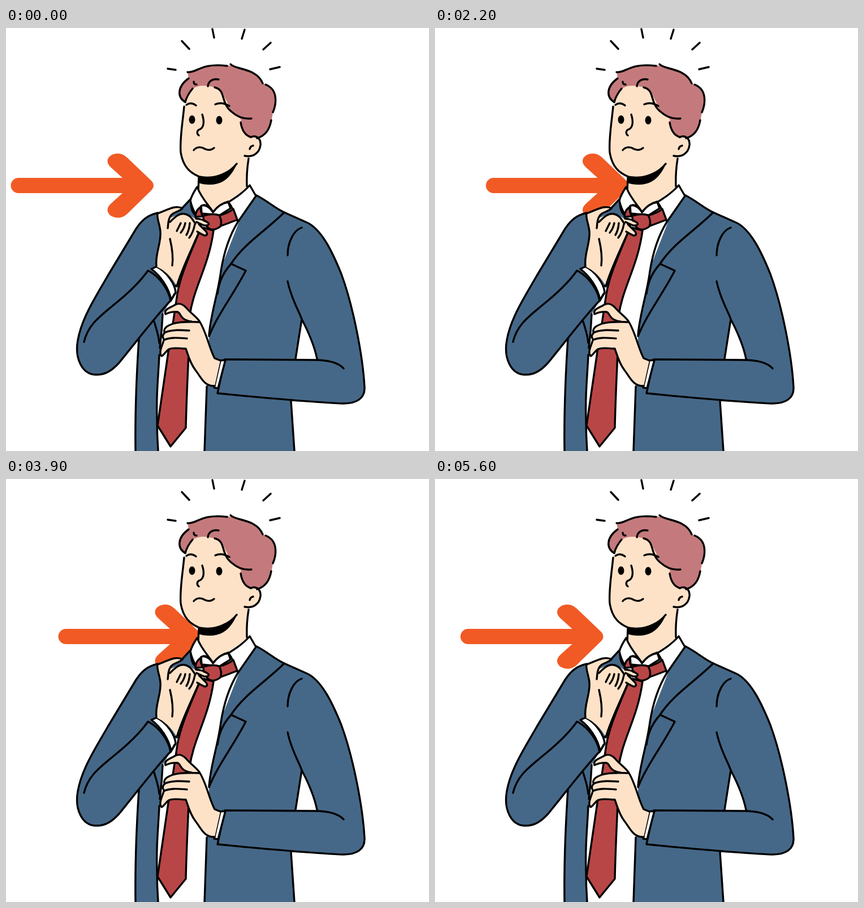
Recreate the animation shown at these times as an HTML page. Size 748 px wide and 748 px high, loop 5.7 s.

```html
<!DOCTYPE html>
<html lang="en">
<head>
<meta charset="utf-8">
<title>Man adjusting his tie</title>
<style>
  html, body { margin: 0; width: 100%; height: 100%; overflow: hidden; background: #fff; }
  svg { display: block; width: 100%; height: 100%; }
  path { stroke-linecap: round; stroke-linejoin: round; }
  .line { fill: none; stroke: #000; stroke-width: 3.4; }
  .suit { fill: #466888; }
  .skin { fill: #fee2c8; }
  .hair { fill: #c47a7c; }
  .tie { fill: #b94647; }
  .white { fill: #fff; }
  .edge { stroke: #000; stroke-width: 3.4; }
</style>
</head>
<body>
<svg viewBox="0 0 748 748">
  <path id="arrow" fill="#f15a24" d="M22 265H206L185 246C173 235 182 222 198 222C205 222 209 225 214 229L257 270Q265 278.5 257 287L214 329C209 333 205 335.500 198 335.500C182 335.500 173 322 185 311L206 292H22A13.500 13.500 0 0 1 22 265Z"/>

  <!-- jacket, right side -->
  <path class="suit" d="M441 295C460 304 475 318 492 326L530 343C558 354 578 398 593 435C614 492 631 580 634 635C635 655 620 664 597 664L504 660L510 748H340L359 545L380 425L412 343Z"/>
  <path class="white" d="M523 515L512 586H550C544 560 533 534 523 515Z"/>

  <!-- shirt -->
  <path class="white" d="M330 308L305 452L277 508L268 650L269 748H351L355 632L359 545C364 500 374 466 380 430C386 395 396 368 411 342L366 322Z"/>

  <!-- jacket, left side -->
  <path class="suit" d="M326 302L312 318L268 327C250 331 240 340 230 355L180 438C160 473 134 512 127 552C121 585 135 612 158 613C176 614 188 605 200 592L235 549C231 610 228 680 229 748H269C265 710 266 665 268 640L273 565L277 506L291 482L300 460L337 332Z"/>
  <path class="line" d="M268 327C250 331 240 340 230 355L180 438C160 473 134 512 127 552C121 585 135 612 158 613C176 614 188 605 200 592C235 549 262 513 291 482C287 461 270 438 251 429C235 452 210 474 190 490C165 511 145 525 138 555"/>
  <path class="line" d="M235 549C231 610 228 680 229 748M262 519C266 533 270 543 271 557M277 506C276 530 274 550 272 566M271 578C270 610 265 650 267 690Q267 720 269 748M326 303L311 319M327 303Q326 325 336 332"/>

  <!-- jacket seams and right arm -->
  <path class="line" d="M441 295C460 304 475 318 492 326L530 343C558 354 578 398 593 435C614 492 631 580 634 635C635 655 620 664 597 664C550 663 470 655 374 646L387 586L545 587C570 587 588 592 597 602M504 660L510 748M355 634L351 748"/>
  <path class="line" d="M492 326C460 358 420 382 398 417L424 429C402 472 375 505 359 545M398 417C380 437 376 455 374 470M410 343C392 372 384 405 380 430C375 470 362 505 359 543"/>
  <path class="line" d="M498 402C498 380 508 358 523 353M498 448C505 481 519 502 523 515C534 536 545 560 550 585M523 515L512 585"/>

  <!-- neck and collar -->
  <path class="skin" d="M341 255L340 290C346 305 356 316 366 325C383 312 408 297 427 280L430 215Z"/>
  <path class="line" d="M341 263L340 288M429 231Q425 255 426 280"/>
  <path class="white edge" d="M338 281C332 290 328 297 326 305Q329 319 336 330L345 315C352 309 360 317 366 325C356 310 345 300 338 281Z"/>
  <path class="white edge" d="M431 278L442 297L410 343C406 330 400 317 393 307C385 309 376 315 366 326C385 311 413 299 431 278Z"/>
  <path class="white edge" d="M345 315C350 311 360 316 366 326C374 315 384 309 393 308L397 319L378 331L346 328Z"/>

  <!-- tie -->
  <path class="tie edge" d="M345 316C338 320 335 327 335 334L348 333Q343 324 345 316ZM378 331Q392 328 402 320L409 339Q394 345 380 350Z"/>
  <path class="tie edge" d="M345 352C326 400 309 435 303 470L291 550L288 566L268 703L291 740L318 707C319 660 321 620 323 575L324 515C330 460 358 425 367 358Z"/>
  <path class="tie edge" d="M349 332Q365 327 377 331Q383 343 379 351Q370 358 362 356Q349 350 349 332Z"/>

  <!-- raised hand and cuff -->
  <path class="white edge" d="M257 426L266 422C283 430 299 452 300 468L292 481C288 459 273 438 257 426Z"/>
  <path class="skin" d="M268 328C285 322 300 312 312 319C304 326 294 326 290 336C300 332 308 326 318 329C327 331 331 336 336 338L358 345Q362 351 347 349L355 362Q353 371 341 363C331 385 318 417 302 456C293 440 280 428 266 422C263 400 275 380 273 360Z"/>
  <path class="line" d="M302 457C309 430 329 390 340 364M266 422C263 400 275 380 273 360C272 347 266 336 268 328C285 322 300 312 312 319C305 326 294 325 290 334C286 341 287 349 286 354M290 343C298 335 307 326 317 329C327 331 331 341 335 346M290 373C294 390 296 405 294 420M309 345L302 359M317 345Q315 355 309 362M325 345Q324 358 319 366M334 347Q331 362 324 371M336 337Q350 338 358 345Q360 350 350 349Q342 346 337 343M341 347L354 360Q358 367 351 367Q344 364 338 360M300 456L307 452M298 470L291 483"/>

  <!-- lower hand and cuff -->
  <path class="white edge" d="M379 588L388 587L375 637L368 636Z"/>
  <path class="skin" d="M282 506C279 497 290 495 298 490C306 485 312 488 318 494C328 506 338 511 343 520C355 540 360 568 369 584L379 588L369 633C350 634 344 616 335 605C325 592 322 578 318 567C306 567 296 564 288 568C282 572 279 579 275 580C269 574 277 560 279 552C275 547 279 542 280 539C278 532 284 528 293 524C305 519 318 520 328 520C318 516 309 512 307 504Q302 501 282 506Z"/>
  <path class="line" d="M369 633C350 634 344 616 335 605C325 592 322 578 318 567C306 567 296 564 288 568C282 572 279 579 275 580C269 574 277 560 279 552C290 546 306 548 320 549M279 550C275 545 279 540 282 538C295 533 310 534 324 535M280 538C278 530 286 526 295 523C310 518 328 520 343 520C338 511 328 506 318 494C312 488 306 485 298 490C290 495 279 497 282 506Q292 501 303 502C310 503 306 516 328 519M343 520C355 540 360 568 369 584L379 588"/>

  <!-- head -->
  <path class="skin" d="M331 105C318 122 316 142 314 155C309 182 307 205 309 220C313 245 325 256 342 263C365 269 395 258 409 240L430 226C445 226 452 214 450 202C447 192 438 190 431 194L420 120L370 95Z"/>
  <path class="hair" d="M321 78C340 80 345 60 392 66C420 69 447 78 454 98C482 109 479 135 472 149C468 175 462 190 443 195Q437 191 432 193C420 188 417 177 415 160C397 153 395 138 390 129C383 115 380 105 369 105Q344 98 331 107Q320 119 317 131C303 124 302 104 323 89Z"/>
  <path d="M341 262C365 269 393 259 409 239C398 264 384 277 360 277Q348 277 341 274Z"/>
  <path class="line" d="M330 107Q320 119 317 131M315 139C312 170 307 196 309 220C313 245 325 256 342 263C365 268 393 259 408 240M433 193C441 189 451 194 450 207C448 222 436 229 422 226M437 208Q432 209 431 214"/>
  <path class="line" d="M321 78C338 80 343 61 391 67M397 64C405 74 443 70 454 98M459 100C482 109 478 135 472 149M469 163C466 180 459 190 444 195M415 167C417 180 423 190 433 193M369 105C390 110 378 132 400 149Q415 162 434 160M323 89C302 104 303 123 317 131M332 95Q332 100 337 100M357 103C358 93 367 89 376 91"/>
  <path class="line" d="M319 136Q327 130 336 137M370 135Q382 130 395 138M347 153C351 165 350 176 343 179C337 181 337 187 341 190M332 216C338 209 346 210 352 214Q361 218 368 212"/>
  <ellipse cx="329" cy="162" rx="5.500" ry="7.500"/>
  <ellipse cx="377" cy="163" rx="5.500" ry="7.500"/>
  <path class="line" d="M311 23L324 37M365 2L368 17M422 3L417 19M468 26L455 38M286 72L300 74M467 73L484 69"/>
</svg>
<script>
  const LOOP = 5700, STEP = 100, CYCLE = LOOP / 4;
  // [time within one swing, horizontal shift]
  const swing = [
    [0, 0], [75, -7], [150, -9.5], [275, -9], [325, -7], [375, 1.5], [450, 13],
    [525, 28.5], [600, 56.5], [675, 72], [750, 80], [850, 86], [925, 87.5],
    [1000, 86], [1050, 84], [1125, 77], [1200, 64], [1325, 36.5], [1350, 25],
    [1375, 16.5], [CYCLE, 0]
  ];
  const arrow = document.getElementById('arrow');

  function shiftAt(time) {
    const phase = time % CYCLE;
    const i = swing.findIndex(([t]) => t > phase);
    const [t0, x0] = swing[i - 1], [t1, x1] = swing[i];
    return x0 + (x1 - x0) * (phase - t0) / (t1 - t0);
  }

  const start = performance.now();
  function draw() {
    const time = Math.max(0, performance.now() - start) % LOOP;
    const held = Math.floor(time / STEP) * STEP;
    arrow.setAttribute('transform', `translate(${shiftAt(held)} 0)`);
    requestAnimationFrame(draw);
  }
  draw();
</script>
</body>
</html>
```
